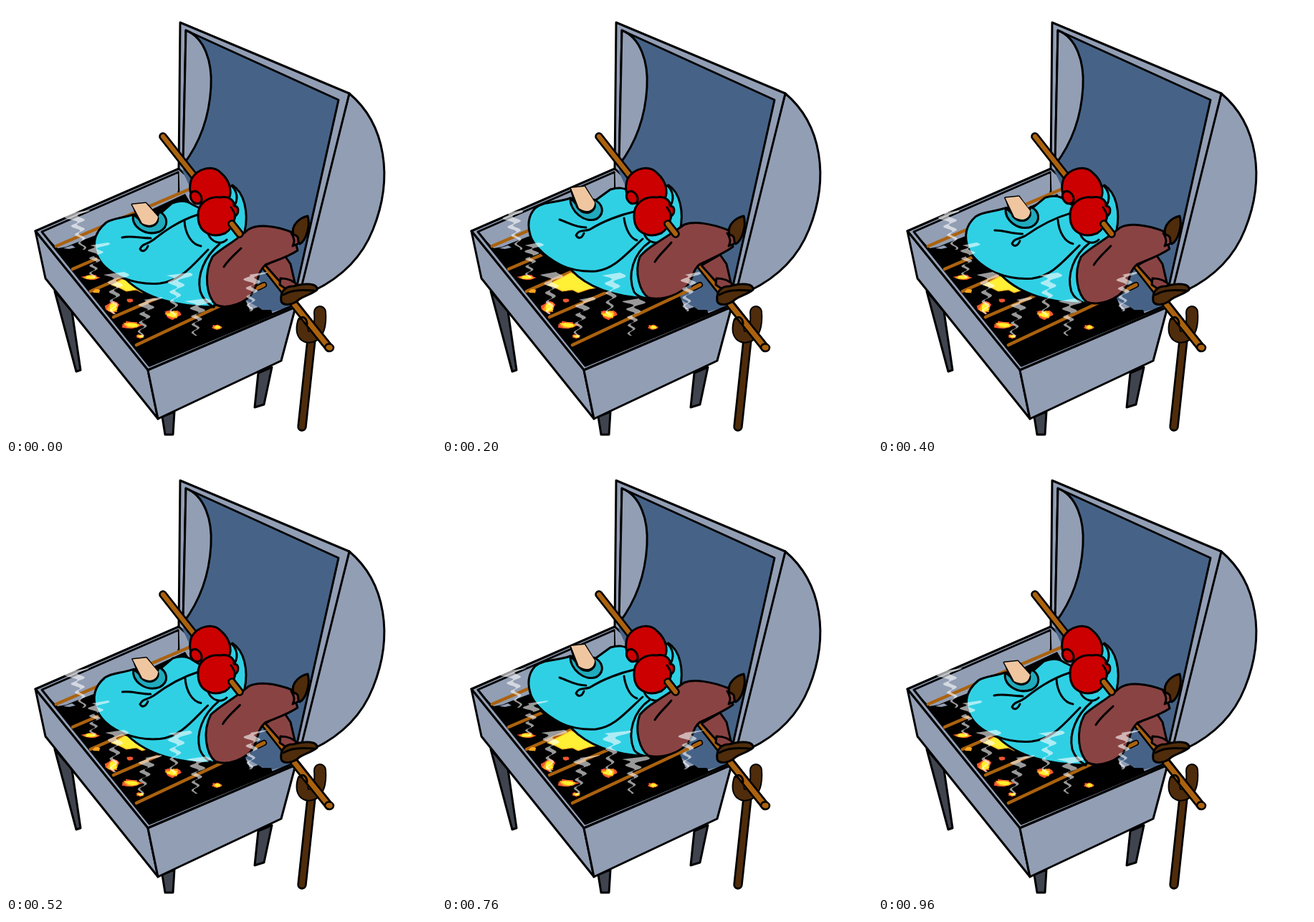
Animation, 600 px wide and 600 px high, one loop 1 s. Source, as an HTML page with a canvas:

```html
<!DOCTYPE html>
<html lang="en">
<head>
<meta charset="utf-8">
<title>Barbecue</title>
<style>
html, body { margin: 0; width: 100%; height: 100%; overflow: hidden; background: #fff; }
canvas { display: block; width: 100vmin; height: 100vmin; }
</style>
</head>
<body>
<canvas id="stage" width="600" height="600"></canvas>
<script>
const g = document.getElementById('stage').getContext('2d');
const GREY = '#929eb4', BLUE = '#466387', LEG = '#3f444f', WOOD = '#ab620e',
      DARK = '#4f2c0b', SHIRT = '#30d0e4', PANTS = '#8a4343', RED = '#cc0000';
g.lineJoin = g.lineCap = 'round';

function draw(d, fill, line = '#000', width = 3) {
  const p = new Path2D(d);
  if (fill) { g.fillStyle = fill; g.fill(p); }
  if (line) { g.strokeStyle = line; g.lineWidth = width; g.stroke(p); }
}

// A rounded stick with a black edge
function stick(d, color, width, edge = 2.7) {
  draw(d, null, '#000', width + edge * 2);
  draw(d, null, color, width);
}

// Blends two paths that share the same commands
function mix(a, b, k) {
  const to = b.match(/[\d.]+/g);
  let i = 0;
  return a.replace(/[\d.]+/g, n => +n + (to[i++] - n) * k);
}

function noise(seed) {
  const v = Math.sin(seed * 127.1) * 43758.5453;
  return v - Math.floor(v);
}

function blob(x, y, rx, ry, color, seed) {
  g.fillStyle = color;
  g.beginPath();
  for (let i = 0; i < 13; i++) {
    const a = i / 13 * Math.PI * 2, r = 0.55 + 0.65 * noise(seed + i);
    g.lineTo(x + Math.cos(a) * rx * r, y + Math.sin(a) * ry * r);
  }
  g.fill();
}

function flame(x, y, rx, ry, seed) {
  blob(x, y, rx, ry, '#f4572f', seed);
  blob(x + 1, y, rx * 0.85, ry * 0.8, '#ffa51f', seed + 1);
  blob(x + 1, y, rx * 0.6, ry * 0.65, '#fff02e', seed + 2);
}

function grill() {
  draw('M68 398L98 510L104 508L92 426Z', LEG);
  draw('M218 573L222 598L233 598L235 566Z', LEG);
  draw('M352 512L347 560L360 556L371 504Z', LEG);

  // Lid
  draw('M479 122C530 165 541 240 512 312C495 355 465 380 430 397L404 408Z', GREY);
  draw('M243 23L479 122L409 405L404 420L241 228Z', GREY);
  draw('M251 34L464 131L405 395L396 420L366 428L320 410L247 222Z', BLUE);
  draw('M251 34C277 44 288 78 286 113C284 150 273 188 247 222Z', GREY);

  // Box
  draw('M41 314L241 227L260 244L404 420L198 508Z', GREY);
  draw('M246 230L260 220L405 395L396 420L366 428L330 408Z', BLUE, null);
  draw('M240 232L241 262');
  draw('M50 316L72 338L84 336L96 331L130 318L250 262L330 400L340 424L352 420L358 424L370 424L372 430L200 502Z', '#000', null);
  draw('M80 338L92 334L97 337L88 339Z', GREY, null);
  draw('M53 318L76 336L240 258L240 234Z', GREY, null);
  draw('M240 232L50 315L200 502L396 420');

  for (const d of ['M70 335L255 256', 'M93 367L280 287', 'M118 398L310 314', 'M150 434L340 352'])
    draw(d, null, WOOD, 4.6);
  stick('M352 393L360 389', WOOD, 5, 1.6);
  draw('M182 473L359 390', null, WOOD, 4.6);

  draw('M147 389L180 372L222 392L205 395L190 400L182 396L168 398L158 393Z', '#ffef35', '#ffac24', 1.2);
  flame(117, 379, 13, 4, 4);
  flame(149, 421, 10, 9, 8);
  flame(174, 445, 16, 5, 15);
  flame(187, 461, 7, 3, 21);
  flame(231, 431, 13, 7, 30);
  flame(294, 448, 7, 4, 41);
  blob(172, 411, 5, 3, '#f4572f', 3);
  blob(127, 398, 6, 3, '#ffa51f', 9);
}

function boxFront() {
  draw('M41 314L198 508L212 576L55 380Z', GREY);
  draw('M198 508L404 420L384 495L212 576Z', GREY);
}

function fork() {
  stick('M426 466L413 587', DARK, 8);
  stick('M415 441C410 459 419 465 429 460C438 454 439 440 438 427', DARK, 14, 2);
}

function body(k) {
  const pose = (a, b, fill) => draw(mix(a, b, k), fill);
  pose('M178 291C158 297 150 296 140 302C118 320 123 338 127 348C135 366 150 374 168 382C195 408 240 420 290 420L300 380L333 315C339 287 332 260 316 250L270 282L260 277C250 270 240 272 232 275L215 290Z',
       'M179 268C160 275 142 272 130 282C118 295 120 312 125 325C135 345 160 360 180 368C205 395 245 406 288 408L290 360L332 314C338 287 332 260 316 250L270 270L265 262C255 252 245 253 235 256L213 272Z', SHIRT);
  pose('M127 348C140 378 185 390 215 387C245 383 260 362 282 340',
       'M125 325C140 360 185 372 215 370C240 367 255 348 280 325');
  pose('M162 323C175 320 186 324 202 324', 'M164 298C176 302 186 309 201 309');
  pose('M268 291C240 300 220 315 206 326C195 334 191 331 187 339C190 344 195 342 198 335',
       'M268 287C250 291 225 300 206 312C195 315 191 312 187 320C190 325 195 325 198 317');
  pose('M249 300C250 318 259 333 272 335', 'M254 296C256 310 262 324 272 327');
  pose('M298 332C277 350 266 375 271 398C274 407 280 415 290 420',
       'M290 329C267 345 258 375 268 399C272 405 278 407 288 408');
  draw('M282 318C287 330 300 334 308 326');
  draw('M316 252C325 262 323 275 316 282');

  // Collar and neck
  pose('M178 291C173 306 193 322 214 315C228 308 226 293 214 287L208 301L190 301Z',
       'M179 268C178 286 199 304 216 297C229 288 223 275 212 270L208 282L190 279Z', '#20aabd');
  pose('M178 279C181 290 184 295 188 302C196 309 205 309 211 301C214 295 204 286 198 278',
       'M180 255C183 268 185 273 189 281C196 290 206 291 212 283C217 276 206 269 200 257');
  pose('M176 277L195 275L212 296C212 306 201 311 192 305Z',
       'M180 254L199 252L213 275C214 286 203 291 193 284Z', null);
  draw(mix('M176 277L195 275L212 294C211 305 201 309 190 303Z',
           'M180 254L199 252L213 274C213 285 203 290 191 282Z', k), '#efc6a0', null);

  stick('M219 182L451 477', WOOD, 6.2);

  // Rear leg, then front leg
  draw('M362 362L388 347L397 360L403 386L386 389Z', PANTS);
  pose('M400 316C375 306 350 304 338 312C318 330 300 338 288 350C275 375 280 405 293 417C310 424 335 414 345 399C352 386 350 372 362 361C377 355 394 350 407 341Z',
       'M400 313C375 303 352 300 338 305C315 322 288 335 276 350C268 372 276 399 288 407C310 412 335 401 345 387C352 375 350 368 360 360C377 352 392 346 406 336Z', PANTS);
  pose('M304 364C310 354 319 347 328 338', 'M297 357C303 347 312 340 320 330');
}

function shoesAndGloves() {
  draw('M398 317C402 323 403 330 400 335L409 331L411 319Z', PANTS);
  draw('M421 293C425 306 419 327 410 332C405 330 412 321 401 319C397 305 411 295 421 293Z', DARK);
  draw('M383 380C394 380 402 384 407 390L394 397L382 389Z', PANTS);
  draw('M384 412C382 397 391 391 401 391C419 386 435 387 434 396C424 404 412 405 406 412C397 418 386 418 384 412Z', DARK);
  draw('M387 403C402 394 419 397 430 397');

  draw('M259 241C268 226 289 221 300 233C315 246 317 266 307 272C292 280 276 277 269 274C255 268 255 252 259 241Z', RED);
  draw('M259 260C264 256 271 260 273 268C274 275 268 277 263 275C257 271 256 264 259 260Z', RED);
  draw('M268 293C267 276 282 265 299 267C311 265 319 271 318 279C326 279 325 290 320 293C318 303 314 312 306 317C289 324 268 318 268 293Z', RED);
  draw('M314 281C318 287 322 292 317 301');
  stick('M315 304L326 318', WOOD, 6.2);
}

function rodEnd() {
  fork();
  stick('M402 416L451 477', WOOD, 7);
  draw('M409 437C414 431 420 436 420 444', null);
  draw('M445 476C447 469 457 471 457 477C456 484 446 483 445 476Z', WOOD, '#000', 2.5);
}

// A zigzag ribbon that widens upwards and ends in a flat cap
function wisp(x0, y0, x1, y1, size, swell, phase) {
  const left = [], right = [];
  for (let i = 0; i <= 40; i++) {
    const u = i / 40;
    const cx = x0 + (x1 - x0) * u + Math.sin(u * 27 + phase) * (3 + 4 * u);
    const w = 1.5 + size * u * u * 0.45 + Math.max(0, u - 0.8) * size * (1 + 2 * swell);
    const y = y0 + (y1 - y0) * u;
    left.push([cx - w, y + 2 * u]);
    right.unshift([cx + w, y - 2 * u]);
  }
  g.beginPath();
  for (const p of left.concat(right)) g.lineTo(...p);
  g.fill();
}

function smoke(t) {
  const turn = t / 960 * Math.PI * 2;
  const swell = 0.5 + 0.5 * Math.cos(turn - 5.1);
  const sway = Math.sin(turn) * 0.7;
  g.fillStyle = 'rgba(255,255,255,.6)';
  wisp(108, 340, 96, 287, 14, swell, sway);
  wisp(120, 379, 128, 332, 12, swell, 1 + sway);
  wisp(149, 430, 155, 373, 14, swell, 2 + sway);
  wisp(187, 462, 200, 408, 12, swell, 0.5 + sway);
  wisp(232, 432, 241, 374, 16, swell, 1.4 + sway);
  wisp(263, 460, 270, 410, 15, swell, 2.2 + sway);
  wisp(340, 426, 346, 373, 12, swell, 0.2 + sway);
}

function frame(now) {
  const t = Math.floor(now % 1000 / 40) * 40;
  const lift = 1 - Math.abs(t % 480 / 240 - 1);
  g.fillStyle = '#fff';
  g.fillRect(0, 0, 600, 600);
  grill();
  boxFront();
  body(lift * 1.2);
  rodEnd();
  shoesAndGloves();
  smoke(t);
  requestAnimationFrame(frame);
}
requestAnimationFrame(frame);
</script>
</body>
</html>
```
